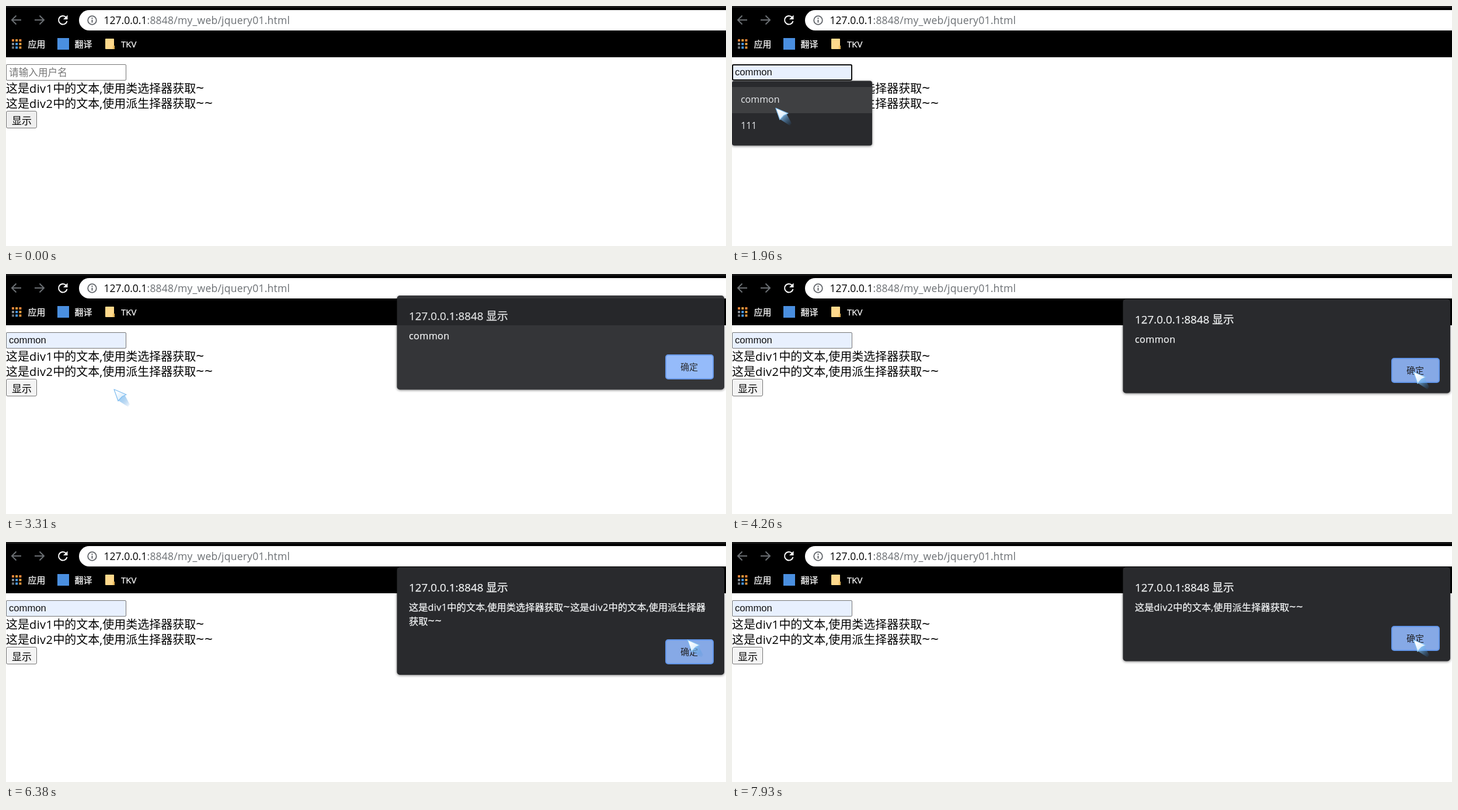
Write an HTML page that moves like this. It is 1233 px wide and 412 px high and loops after 8000 ms.

```html
<!DOCTYPE html>
<html lang="zh">
<head>
<meta charset="utf-8">
<style>
html, body { margin: 0; height: 100%; overflow: hidden; background: #fff; }
svg { display: block; width: 1233px; height: 412px; font-family: "Open Sans", "Noto Sans CJK SC", sans-serif; }
.latin { letter-spacing: .02em; }
.tilde { font-size: 1.22em; letter-spacing: .03em; }
.bar { font-size: 15px; fill: #fff; stroke: #fff; stroke-width: .25; }
.field { font: 16.67px "Liberation Sans", Arial, sans-serif; fill: #111; }
.hint { font-size: 16.67px; fill: #757575; }
.line { fill: none; stroke-width: 2; }
.box { stroke: #767676; }
#popup, #dialog { filter: drop-shadow(0 1px 2px #0008); }
#popup text { font-size: 16px; fill: #e8eaed; }
#dialog text { font-size: 16.25px; fill: #f1f3f4; stroke: #f1f3f4; stroke-width: .25; }
#dialog #title { font-size: 18.8px; }
#dialog #ok text { font-size: 15px; fill: #202124; stroke: none; }
</style>
</head>
<body>
<svg viewBox="0 0 1233 412">
  <defs>
    <linearGradient id="body" x1="0" y1="0" x2="1" y2="1">
      <stop offset=".2" stop-color="#fff"/><stop offset="1" stop-color="#c4e2fa"/>
    </linearGradient>
    <linearGradient id="tail" x1="0" y1="0" x2="1" y2="1">
      <stop offset=".2" stop-color="#8cc6f4" stop-opacity=".8"/><stop offset="1" stop-color="#2a7fd0" stop-opacity="0"/>
    </linearGradient>
  </defs>

  <!-- browser bar -->
  <rect width="1233" height="88"/>
  <rect y="1" width="1233" height="1" fill="#3a3a3a"/>
  <rect x="125" y="7" width="1200" height="35" rx="17.5" fill="#fff"/>
  <path class="line" stroke="#6b6f73" d="M26 24H10M17.500 16.500 10 24l7.500 7.500M49 24h16M57.500 16.500 65 24l-7.500 7.500"/>
  <path class="line" stroke="#fff" d="M103 19.500A7.300 7.300 0 1 0 104.500 26"/>
  <path fill="#fff" d="M105.500 15.500v7.500h-7.500z"/>
  <circle class="line" stroke="#5f6368" cx="147.500" cy="24.500" r="7.300" style="stroke-width:1.800"/>
  <path class="line" stroke="#5f6368" d="M147.500 23.500v5M147.500 20v2"/>
  <text x="167.500" y="31" font-size="17.500">127.0.0.1</text>
  <text x="241.500" y="31" font-size="17.500" letter-spacing=".23" fill="#6b6f73">:8848/my_web/jquery01.html</text>
  <g id="apps"></g>
  <text class="bar" x="37.500" y="71">应用</text>
  <rect x="88" y="55" width="20" height="20" fill="#4a8fe0"/>
  <text class="bar" x="117.500" y="71">翻译</text>
  <path fill="#ffd98c" d="M171 56h13q1 0 1 1v11h1v6h-15q-1 0-1-1V57q0-1 1-1z"/>
  <path fill="#e9b95c" d="M183 68h3v6h-3z"/>
  <text class="bar" x="197" y="71">TKV</text>

  <!-- page -->
  <rect id="input" class="box" x=".5" y="100.500" width="205" height="27" rx="1.500"/>
  <rect id="focus" class="line" stroke="#101010" x="1" y="101" width="204" height="26" rx="2"/>
  <text id="hint" class="hint" x="5" y="119.500">请输入用户名</text>
  <text id="value" class="field" x="5" y="119">common</text>
  <rect id="caret" y="105" width="1" height="18"/>
  <text id="div1" x="0" y="149" font-size="20"></text>
  <text id="div2" x="0" y="175" font-size="20"></text>
  <rect id="show" class="box" x=".5" y="180.500" width="52" height="29" rx="2.500"/>
  <text x="10" y="202.500" font-size="17">显示</text>

  <g id="popup">
    <rect y="128.500" width="240" height="111" rx="4" fill="#292a2d"/>
    <rect id="row" y="139" width="240" height="45" fill="#3f4042"/>
    <text x="15" y="165.500">common</text>
    <text x="15" y="210.500">111</text>
  </g>

  <g id="dialog">
    <rect id="panel" x="669.500" y="43" width="560.500" rx="5" fill="#292a2d"/>
    <text id="title" x="690" y="84.500">127.0.0.1:8848 显示</text>
    <text id="text1" x="690" y="118"></text>
    <text id="text2" x="690" y="141.500"></text>
    <g id="ok">
      <rect id="face" x="1130" y="145" width="81" height="41" rx="4" stroke="#6296ea" stroke-width="2"/>
      <text x="1155" y="171">确定</text>
    </g>
  </g>

  <g id="cursor">
    <path fill="url(#tail)" d="M8 20 19 10 28 27 25 31z"/>
    <path fill="url(#body)" stroke="#7fbcee" stroke-width="1.200" stroke-linejoin="round" d="M1 1 22 10 15 13.500 8 21z"/>
  </g>
</svg>
<script>
const $ = id => document.getElementById(id);
const set = (id, name, value) => $(id).setAttribute(name, value);
const visible = (id, on) => set(id, 'visibility', on ? 'visible' : 'hidden');
const mixed = s => s.replace(/[a-z0-9]+|~+/g, m =>
  `<tspan class="${m[0] === '~' ? 'tilde' : 'latin'}">${m}</tspan>`);

const first = '这是div1中的文本,使用类选择器获取~';
const second = '这是div2中的文本,使用派生择器获取~~';
$('div1').innerHTML = mixed(first);
$('div2').innerHTML = mixed(second);

const dots = ['#e8833a', '#e89a3c', '#e8833a', '#8a8f94', '#4a9be8', '#e8a03c', '#6e7276', '#4a9be8', '#d9903c'];
$('apps').innerHTML = dots.map((c, i) =>
  `<rect x="${10 + i % 3 * 6.2}" y="${57 + (i / 3 | 0) * 6.2}" width="4" height="4" fill="${c}"/>`).join('');

const dialogs = [
  { from: 3243, to: 4660, lines: ['common', ''] },
  { from: 4876, to: 6070, lines: [first, ''] },
  { from: 6246, to: 7580, lines: [first + second.slice(0, -4), second.slice(-4)] },
  { from: 7796, to: 9000, lines: [second, ''] }
];

// cursor path: time, x, y
const path = [
  [210, 461, 315], [280, 400, 302], [420, 168, 245], [560, 105, 150], [810, 80, 114],
  [1020, 80, 114], [1150, 76, 160], [1210, 74, 174], [1960, 74, 174], [2160, 62, 214],
  [2230, 56, 221], [2300, 56, 221], [2450, 36, 205], [2630, 30, 196], [3100, 30, 196],
  [3200, 60, 196], [3310, 184, 197], [3370, 184, 197], [3450, 530, 198], [3650, 980, 175],
  [3850, 1101, 155], [3920, 1101, 155], [4260, 1166, 167], [8000, 1166, 167]
];

function cursorAt(t) {
  const i = path.findIndex(p => p[0] > t);
  const [a, b] = [path[i - 1], path[i]];
  const k = (t - a[0]) / (b[0] - a[0]);
  return [a[1] + (b[1] - a[1]) * k, a[2] + (b[2] - a[2]) * k];
}

// Dialogs drop in and lift out in coarse steps.
function drawDialog(t) {
  const d = dialogs.find(d => t >= d.from && t < d.to + 134);
  visible('dialog', d);
  if (!d) return;
  const leaving = t >= d.to;
  const n = Math.floor((t - (leaving ? d.to : d.from)) / 67);
  const e = leaving ? [.7, .3][n] : [.3, .7, 1][Math.min(n, 2)];
  const extra = d.lines[1] ? 23.5 : 0;
  set('dialog', 'transform', `translate(0 ${-20 * (1 - e)})`);
  set('dialog', 'opacity', Math.min(1, e * 1.35));
  set('panel', 'height', 161.5 + extra);
  set('ok', 'transform', `translate(0 ${extra && 23})`);
  set('face', 'fill', t > 4050 ? '#86a9e6' : '#8fb8fa');
  ['text1', 'text2'].forEach((id, i) => {
    const html = mixed(d.lines[i]);
    if ($(id).dataset.html !== html) $(id).innerHTML = $(id).dataset.html = html;
  });
}

function draw(t) {
  const focus = t >= 740 && t < 3170;
  const filled = t >= 1290;
  const chosen = t >= 2030;
  set('input', 'fill', filled ? '#e8f0fe' : '#fff');
  visible('focus', focus);
  visible('hint', !filled);
  visible('value', filled);
  visible('caret', focus && (!filled || chosen));
  set('caret', 'x', filled ? 68 : 5);
  set('show', 'fill', t > 2450 && t < 3200 ? '#e5e5e5' : t < 2450 ? '#efefef' : '#f4f4f4');
  visible('popup', t >= 1080 && !chosen);
  visible('row', t >= 1140 && !chosen);
  drawDialog(t);
  visible('cursor', t >= 210);
  if (t >= 210) set('cursor', 'transform', `translate(${cursorAt(t)})`);
}

const start = performance.now();
function frame() {
  draw((performance.now() - start) % 8000);
  requestAnimationFrame(frame);
}
draw(0);
frame();
</script>
</body>
</html>
```
